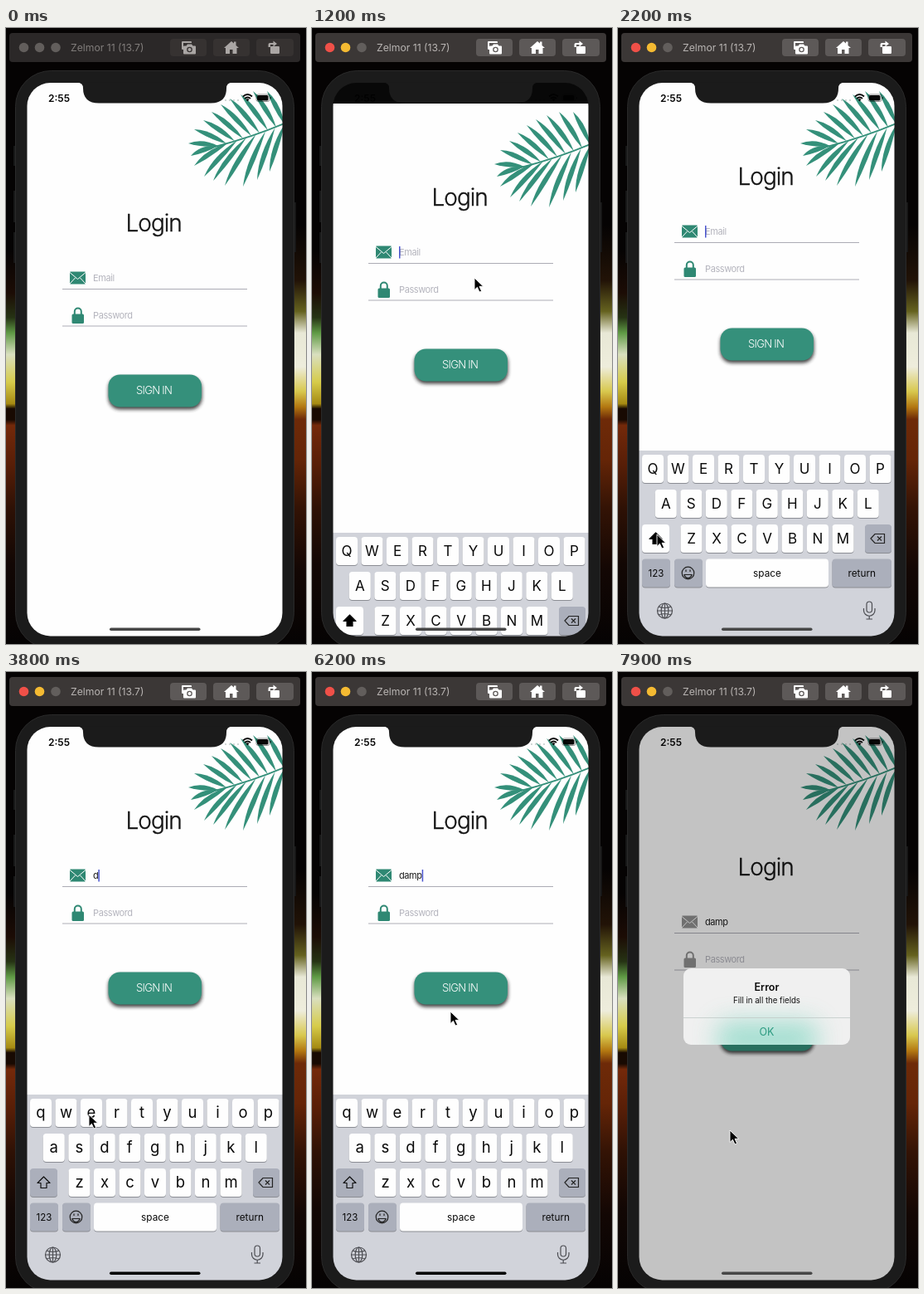
An HTML page that plays this animation: 362x742 px, repeating every 8000 ms.

```html
<!DOCTYPE html>
<html lang="en">
<head>
<meta charset="utf-8">
<title>Login form</title>
<style>
  html, body { margin: 0; width: 100%; height: 100%; overflow: hidden; background: #000; }
  svg { display: block; width: 362px; height: 742px; font-family: Inter, "Liberation Sans", sans-serif; }
  text { white-space: pre; }
  .mid { text-anchor: middle; }
  .hint { font-size: 11px; letter-spacing: -.4px; fill: #b4b4bd; }
  .rule { stroke: #a3a3ad; stroke-width: .9; }
  .tool { fill: #363231; }
  .glyph { fill: #aaa6a4; }
  .dot { fill: #625e5c; }
  #bar { fill: #2b2828; }
  #name { fill: #817d7b; }
  #status { mix-blend-mode: multiply; }
  .active #bar { fill: #3b3736; }
  .active #name { fill: #b9b5b3; }
  .active .tool { fill: #5d5958; }
  .active .glyph { fill: #fff; }
  .active .red { fill: #ef5048; }
  .active .amber { fill: #f4ba32; }
  .key { fill: #fefefe; }
  .key.alt { fill: #abafbb; }
  .line { fill: none; stroke: #4c4d52; stroke-width: 1.2; }
</style>
</head>
<body>
<svg viewBox="0 0 362 742">
  <defs>
    <linearGradient id="left" x1="0" y1="0" x2="0" y2="1">
      <stop offset=".36" stop-color="#050303"/><stop offset=".43" stop-color="#1c0c05"/>
      <stop offset=".47" stop-color="#263314"/><stop offset=".495" stop-color="#5f9a45"/>
      <stop offset=".53" stop-color="#d9dfbf"/><stop offset=".575" stop-color="#d6cb4a"/>
      <stop offset=".61" stop-color="#a58a12"/><stop offset=".618" stop-color="#180a02"/>
      <stop offset=".636" stop-color="#180a02"/><stop offset=".645" stop-color="#74290a"/>
      <stop offset=".71" stop-color="#571e07"/><stop offset=".78" stop-color="#2e1105"/>
      <stop offset=".87" stop-color="#120704"/><stop offset="1" stop-color="#050303"/>
    </linearGradient>
    <linearGradient id="right" x1="0" y1="0" x2="0" y2="1">
      <stop offset=".32" stop-color="#050303"/><stop offset=".41" stop-color="#221307"/>
      <stop offset=".46" stop-color="#65621f"/><stop offset=".495" stop-color="#e8e8d6"/>
      <stop offset=".55" stop-color="#eeeddc"/><stop offset=".59" stop-color="#d8c84e"/>
      <stop offset=".615" stop-color="#b37811"/><stop offset=".635" stop-color="#6e2a08"/>
      <stop offset=".7" stop-color="#652507"/><stop offset=".78" stop-color="#331305"/>
      <stop offset=".88" stop-color="#130704"/><stop offset="1" stop-color="#050303"/>
    </linearGradient>
    <clipPath id="screen"><rect x="25.500" y="66" width="308" height="666.500" rx="28"/></clipPath>
    <clipPath id="card"><rect x="79" y="357" width="201" height="92" rx="9"/></clipPath>
    <filter id="soft" x="-60%" y="-150%" width="220%" height="400%"><feGaussianBlur stdDeviation="15"/></filter>
    <filter id="drop" x="-10%" y="-20%" width="120%" height="150%"><feGaussianBlur stdDeviation="2.200"/></filter>
  </defs>

  <rect width="181" height="742" fill="url(#left)"/>
  <rect x="181" width="181" height="742" fill="url(#right)"/>

  <g id="window">
    <rect id="bar" x="4" y="6" width="351" height="35" rx="4"/>
    <circle class="dot red" cx="21.5" cy="23.5" r="5.8"/>
    <circle class="dot amber" cx="40.5" cy="23.5" r="5.8"/>
    <circle class="dot" cx="60" cy="23.5" r="5.8"/>
    <text id="name" x="78" y="28.3" font-size="12.2">Zelmor 11 (13.7)</text>
    <rect class="tool" x="198" y="13" width="44" height="21" rx="4"/>
    <rect class="tool" x="250" y="13" width="44" height="21" rx="4"/>
    <rect class="tool" x="302" y="13" width="45" height="21" rx="4"/>
    <g class="glyph">
      <path d="M212 17q0-1 1-1h10q1 0 1 1v1h-10v8h-1q-1 0-1-1z"/>
      <path d="M215 21.500h2.500l1.500-2h5l1.500 2h2.500q1 0 1 1v8q0 1-1 1h-13q-1 0-1-1v-8q0-1 1-1z"/>
      <path d="M263 24l9-8 3 2.600v-2h2.500v4.300l3.500 3.100h-2.500v7h-5v-5h-3.500v5h-5v-7z"/>
      <rect x="319" y="22" width="11" height="9" rx="1.200"/>
      <path d="M316.500 23v-3q0-2 2-2h4v-2.500l4.500 3.500-4.500 3.500v-2.500h-3.500v3z"/>
    </g>
    <circle class="tool" cx="221.500" cy="26" r="3.300"/>
    <circle class="glyph" cx="221.500" cy="26" r="2"/>
  </g>

  <path d="M9 142h4v24h-4zM9 196h4v38h-4zM9 246h4v37h-4zM346 210h4v60h-4z" fill="#181818"/>
  <rect x="11.500" y="51.500" width="336" height="696" rx="43" fill="#1b1b1b" stroke="#2a2a2a"/>

  <g clip-path="url(#screen)">
    <rect x="25" y="66" width="309" height="667" fill="#080808"/>
    <g id="page">
      <rect x="25" y="66" width="309" height="667" fill="#fefefe"/>
      <g id="leaf" fill="#34907a"></g>
      <g id="form">
        <text x="144.500" y="245" font-size="28" font-weight="300" letter-spacing="-1" fill="#151515" stroke="#151515" stroke-width=".35">Login</text>
        <g id="icons">
          <rect x="77" y="293.500" width="19" height="15" rx="1"/>
          <path d="M77 294.500l9.500 8 9.500-8M77 308l6.500-7M96 308l-6.500-7" fill="none" stroke="#fff"/>
          <rect x="79.500" y="344.500" width="14.500" height="11.500" rx="1.500"/>
          <path d="M82.800 345v-3.500a4 4 0 0 1 8 0v3.500" fill="none" stroke="currentColor" stroke-width="2"/>
        </g>
        <text id="email" class="hint" x="105" y="305">Email</text>
        <rect id="caret" y="294" width="1.500" height="14.500" fill="#4a55cf"/>
        <text class="hint" x="105" y="350">Password</text>
        <path class="rule" d="M68 314.500h223M68 359h223"/>
        <rect x="123.500" y="420.500" width="113" height="39" rx="14" fill="#222" opacity=".85" filter="url(#drop)"/>
        <rect x="123.500" y="417.500" width="112.500" height="39" rx="14" fill="#35907b"/>
        <text x="157" y="440.800" font-size="13" font-weight="300" letter-spacing="-.7" fill="#fff">SIGN IN</text>
      </g>
    </g>

    <g id="keyboard">
      <rect x="25" y="509" width="309" height="226" fill="#d1d3da"/>
      <g id="keys"></g>
      <g class="line">
        <circle cx="56.500" cy="702" r="9"/>
        <ellipse cx="56.500" cy="702" rx="4.300" ry="9"/>
        <path d="M47.500 702h18M56.500 693v18M49 697q7.500 3 15 0M49 707q7.500-3 15 0"/>
        <rect x="300" y="691" width="6.500" height="13" rx="3.200"/>
        <path d="M296.500 699v2.500a6.700 6.700 0 0 0 13.500 0v-2.500M303.200 708v4M299.500 712h7.500"/>
      </g>
    </g>

    <rect id="dim" x="25" y="66" width="309" height="667" opacity="0"/>

    <g id="status" fill="#080808">
      <text x="51" y="88.800" font-size="12" font-weight="600">2:55</text>
      <g fill="#9aa8a4"><circle cx="265" cy="87" r=".8"/><circle cx="270" cy="87" r=".8"/><circle cx="275" cy="87" r=".8"/><circle cx="280" cy="87" r=".8"/></g>
      <path d="M286 82.500q5.500-5 11 0M288 85q3.500-3 7 0" fill="none" stroke="#080808" stroke-width="1.800"/>
      <path d="M289.500 86q2-1.500 4 0l-2 2.500z"/>
      <rect x="302" y="80" width="16" height="8.500" rx="2.300" fill="none" stroke="#777" stroke-width=".8"/>
      <rect x="303" y="81" width="13.500" height="6.500" rx="1.500"/>
      <path d="M319 82.800q1.800 1.400 0 3z"/>
    </g>

    <g id="alert">
      <g clip-path="url(#card)">
        <rect x="79" y="357" width="201" height="92" fill="#f0f0f0"/>
        <rect x="120" y="422" width="120" height="40" rx="12" fill="#86d8c5" opacity=".75" filter="url(#soft)"/>
        <path d="M79 416.500h201" stroke="#c2cbc8" stroke-width=".8"/>
      </g>
      <text class="mid" x="179.500" y="384" font-size="12.500" font-weight="600" fill="#0c0c0c">Error</text>
      <text class="mid" x="179.500" y="398.500" font-size="9.700" letter-spacing="-.02" fill="#111">Fill in all the fields</text>
      <text class="mid" x="179.500" y="437.500" font-size="12.500" fill="#2c9a80">OK</text>
    </g>

    <rect id="home" x="125" y="722.500" width="109.500" height="3.500" rx="1.750"/>
  </g>
  <path d="M86 65.500q7 .5 7 7 0 18 19 18h135q19 0 19-18 0-6.500 7-7z" fill="#1b1b1b"/>
  <path id="cursor" d="M0 0v14.500l3.400-3.200 2.600 5.700 2.600-1.100-2.600-5.600h4.700z" fill="#000" stroke="#fff" stroke-width=".9"/>
</svg>

<script>
const LOOP = 8000, STEP = 100;
const $ = id => document.getElementById(id);

function add(parent, tag, attrs, label) {
  const el = document.createElementNS('http://www.w3.org/2000/svg', tag);
  for (const k in attrs) el.setAttribute(k, attrs[k]);
  if (label) el.textContent = label;
  parent.append(el);
  return el;
}

// Palm leaf: leaflet tips, with roots spread along a nearly straight stem.
const upper = [[220,139], [227,122], [238,111], [248,101], [259,92], [270,85], [283,80], [298,76], [315,76]];
const lower = [[223,154], [227,166], [239,179], [250,184], [264,190], [286,191], [303,183], [318,173]];
const stem = s => [256 + 80 * s, 142 - 22 * s - 4 * s * s];

function leaflets(tips, bend) {
  tips.forEach(([x, y], i) => {
    const [rx, ry] = stem(i / (tips.length - 1));
    const dx = x - rx, dy = y - ry, len = Math.hypot(dx, dy);
    const ctrl = (f, w) => `${rx + dx * f - dy / len * w},${ry + dy * f + dx / len * w}`;
    add($('leaf'), 'path', { d: `M${rx},${ry}Q${ctrl(.55, bend + 6)} ${x},${y}Q${ctrl(.5, bend - 6)} ${rx},${ry}` });
  });
}
leaflets(upper, 2);
leaflets(lower, 3);
add($('leaf'), 'path', { d: 'M252 143Q296 132 336 115', fill: 'none', stroke: '#34907a', 'stroke-width': 1.8 });

// Keyboard
const letters = [];
function key(x, y, w, label, size, alt) {
  add($('keys'), 'rect', { x, y: y + 1, width: w, height: 34, rx: 4, fill: '#8b8d94' });
  const cap = add($('keys'), 'rect', { x, y, width: w, height: 34, rx: 4, class: alt ? 'key alt' : 'key' });
  const text = label && add($('keys'), 'text',
    { x: x + w / 2, y: y + 17 + size * .36, 'font-size': size, class: 'mid', fill: '#0a0a0a' }, label);
  return { cap, text };
}
[['QWERTYUIOP', 42, 514], ['ASDFGHJKL', 57.8, 556], ['ZXCVBNM', 88.5, 598]].forEach(([row, x, y]) =>
  [...row].forEach((c, i) => letters.push(key(x - 13 + i * 30.5, y, 26, c, 17).text)));
const shift = key(29, 598, 33, '', 0).cap;
key(298, 598, 32, '', 0, true);
key(29, 639.5, 34, '123', 11.5, true);
key(68, 639.5, 34, '', 0, true);
key(106, 639.5, 148, 'space', 11.8);
key(258.5, 639.5, 71.5, 'return', 11.8, true);
const arrow = add($('keys'), 'path',
  { d: 'M45.5 608l7.500 7.500h-4v6h-7v-6h-4z', stroke: '#111', 'stroke-width': 1.2, 'stroke-linejoin': 'round' });
const ink = { fill: 'none', stroke: '#222', 'stroke-width': 1.2 };
add($('keys'), 'path', { ...ink, d: 'M305 615l5-5.500h11.500v11h-11.500zM313 612.500l5 5m0-5l-5 5' });
add($('keys'), 'circle', { ...ink, cx: 84.5, cy: 656.5, r: 7.3 });
add($('keys'), 'path', { ...ink, d: 'M80 658.500h9q-1 4-4.500 4t-4.500-4zM82 652.500v2.500M87 652.500v2.500' });

// Timeline: [time, value...] with linear travel between stops.
const cursorPath = [[400,330,560], [900,196,301], [1400,196,301], [2200,47,610], [2500,47,610], [3200,119,572],
  [3500,119,572], [3800,100,533], [4100,100,533], [4600,271,614], [4800,271,614], [5100,286,531], [5400,286,531],
  [6200,167,409], [6500,156,385], [7100,153,385], [7900,135,552]];
const pageShift = [[1100,56], [1200,25], [1300,9], [1400,2], [1500,0], [6899,0], [6900,-56], [7000,-31], [7100,-11], [7200,-4], [7300,0]];
const boardShift = [[1100,224], [1200,99], [1300,36], [1400,8], [1500,0], [6900,0], [7000,130], [7100,226]];
const alertZoom = [[6900,1.200], [7000,1.140], [7100,1.055], [7200,1.020], [7300,1]];
const alertFade = [[6900,0], [7000,.25], [7100,.6], [7200,.85], [7300,1]];
const dimming = [[6900,0], [7000,.08], [7100,.18], [7300,.23]];
const greying = [[6900,0], [7100,.5], [7400,1]];
const typed = [3500, 4100, 4700, 5200];
const WORD = 'damp';

function at(t, stops) {
  const i = stops.findIndex(s => s[0] > t);
  if (i === 0) return stops[0].slice(1);
  if (i < 0) return stops[stops.length - 1].slice(1);
  const a = stops[i - 1], b = stops[i], p = (t - a[0]) / (b[0] - a[0]);
  return a.slice(1).map((v, k) => v + (b[k + 1] - v) * p);
}

function draw(t) {
  const open = t >= 1100 && t < 6900;
  $('window').setAttribute('class', t >= 1000 ? 'active' : '');

  const move = t >= 1100 ? at(t, pageShift)[0] : 0;
  $('page').setAttribute('transform', `translate(0 ${move})`);
  $('form').setAttribute('transform', `translate(0 ${open ? -56 : 0})`);
  $('keyboard').setAttribute('transform', `translate(0 ${at(t, boardShift)[0]})`);

  const upperCase = t < 2400;
  letters.forEach(el => {
    el.textContent = upperCase ? el.textContent.toUpperCase() : el.textContent.toLowerCase();
    el.setAttribute('font-size', upperCase ? 17 : 18.5);
  });
  shift.setAttribute('class', upperCase ? 'key' : 'key alt');
  arrow.setAttribute('fill', upperCase ? '#000' : 'none');

  const count = typed.filter(k => k <= t).length;
  const email = $('email');
  email.textContent = count ? WORD.slice(0, count) : 'Email';
  email.style.fill = count ? '#1b1b1b' : '';
  const last = count ? typed[count - 1] : 1100;
  $('caret').setAttribute('x', 105 + (count ? email.getComputedTextLength() : 0));
  $('caret').setAttribute('opacity', open && (t - last) % 1000 < 500 ? 1 : 0);

  const grey = at(t, greying)[0];
  const tint = `rgb(${[47, 136, 115].map(c => Math.round(c + (145 - c) * grey))})`;
  $('icons').setAttribute('fill', tint);
  $('icons').setAttribute('color', tint);

  $('dim').setAttribute('opacity', at(t, dimming)[0]);
  $('alert').setAttribute('opacity', at(t, alertFade)[0]);
  $('alert').setAttribute('transform', `translate(179.5 403) scale(${at(t, alertZoom)[0]}) translate(-179.5 -403)`);
  $('home').setAttribute('fill', t >= 2400 && t < 7000 ? '#000' : '#474747');

  $('cursor').setAttribute('transform', `translate(${at(t, cursorPath).join(' ')})`);
  $('cursor').setAttribute('opacity', t < 400 ? 0 : 1);
}

const start = performance.now();
function tick() {
  const t = (performance.now() - start) % LOOP;
  draw(Math.floor(t / STEP) * STEP);
  requestAnimationFrame(tick);
}
tick();
</script>
</body>
</html>
```
